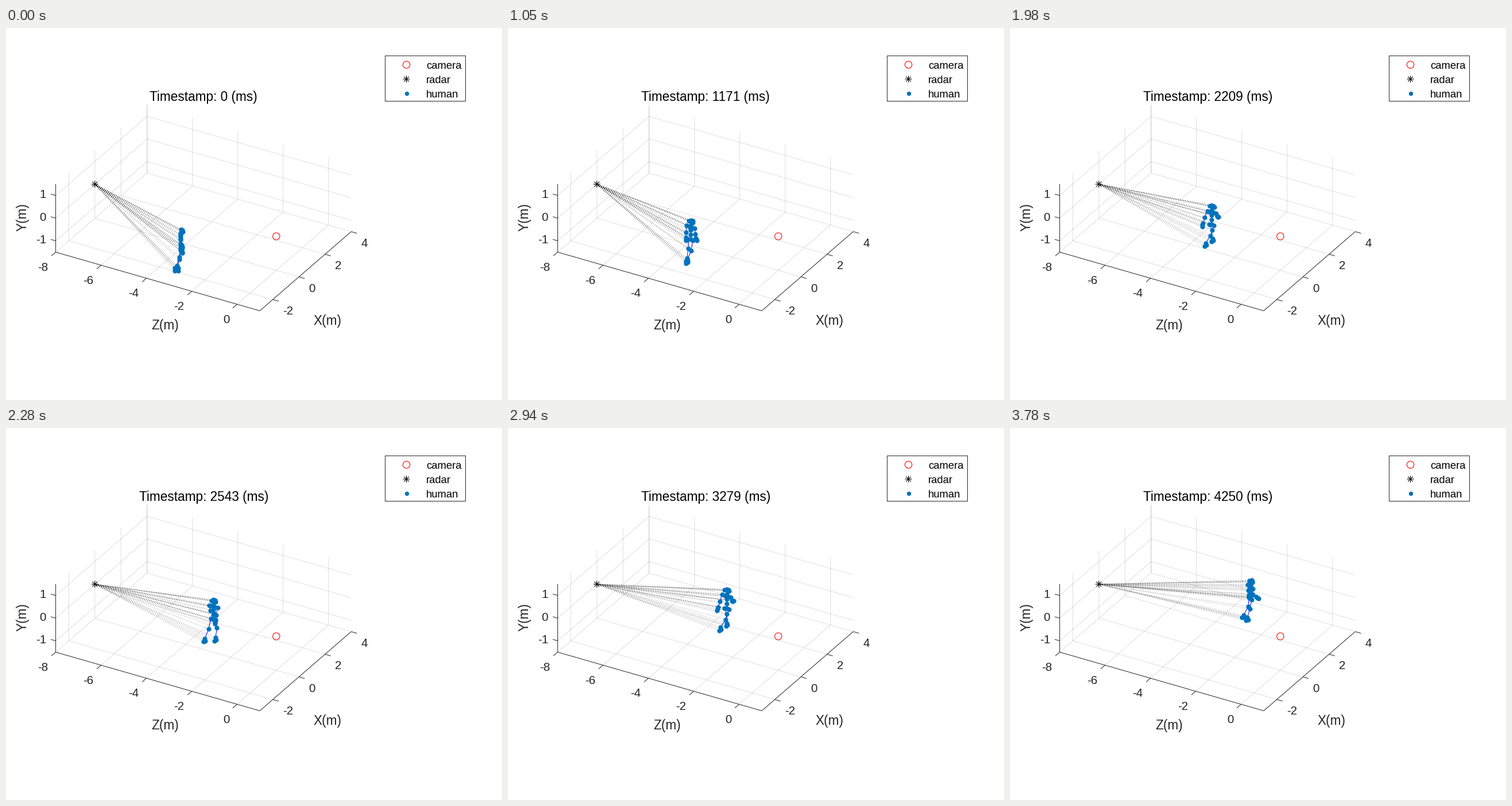
Recreate the animation shown at these times as a matplotlib script. Size 864 by 648 pixels, loop 3810 ms.

```python
import numpy as np
import matplotlib.pyplot as plt
from matplotlib.animation import FuncAnimation
from matplotlib.collections import LineCollection

W, H, DPI = 864, 648, 100
FRAMES, INTERVAL = 127, 30
DARK = (0.15, 0.15, 0.15)
GRID = (0.15, 0.15, 0.15, 0.15)
BLUE = (0, 114 / 255, 189 / 255)
PX = 72 / DPI  # points per pixel
plt.rcParams["font.family"] = "Liberation Sans"
plt.rcParams["path.snap"] = False

fig = plt.figure(figsize=(W / DPI, H / DPI), dpi=DPI, facecolor="white")
ax = fig.add_axes([0, 0, 1, 1])
ax.set_xlim(-0.5, W - 0.5)
ax.set_ylim(H - 0.5, -0.5)
ax.axis("off")

# Orthographic view: pixel step of one metre along X, Y and Z
ORIGIN = np.array([470.3, 362.4])
STEP = np.array([[22.75, -19.7], [0, -39.5], [39.5, 11.35]])


def project(p):
    return ORIGIN + np.asarray(p, float) @ STEP


def segments(pairs, color, width=1.0, z=1, **kw):
    lines = LineCollection(pairs, colors=[color], linewidths=width * PX,
                           zorder=z, **kw)
    ax.add_collection(lines)
    return lines


def label(x, y, text, size, ha="center", **kw):
    return ax.text(x, y, text, fontsize=size * PX, ha=ha, va="baseline", **kw)


def disc(x, y, size, z, **kw):
    return ax.scatter(x, y, s=(size * PX) ** 2, zorder=z, **kw)


def draw_axes():
    x0, x1, y0, y1, z0, z1 = -3, 4, -1.5, 1.5, -8, 1
    xs, ys, zs = (-2, 0, 2, 4), (-1, 0, 1), (-8, -6, -4, -2, 0)
    grid = []
    for x in xs:
        grid += [((x, y0, z0), (x, y0, z1)), ((x, y0, z0), (x, y1, z0))]
    for z in zs:
        grid += [((x0, y0, z), (x1, y0, z)), ((x1, y0, z), (x1, y1, z))]
    for y in ys:
        grid += [((x0, y, z0), (x1, y, z0)), ((x1, y, z0), (x1, y, z1))]
    segments([project(g) for g in grid], GRID)

    front = [((x0, y0, z0), (x0, y1, z0)), ((x0, y0, z0), (x0, y0, z1)),
             ((x0, y0, z1), (x1, y0, z1))]
    segments([project(f) for f in front], DARK, z=2)

    ticks = []
    for x in xs:
        p = project((x, y0, z1))
        ticks.append((p, p + (10, 2.9)))
        label(p[0] + (26 if x < 0 else 23), p[1] + 26, str(x), 20.6, color=DARK)
    for y in ys:
        p = project((x0, y, z0))
        ticks.append((p, p - (8.5, 2.4)))
        label(69.5, p[1] + 4.5, str(y), 20.6, "right", color=DARK)
    for z in zs:
        p = project((x0, y0, z))
        ticks.append((p, p + (-7.5, 6.5)))
        label(p[0] - (22 if z < 0 else 18.5), p[1] + 32.5, str(z), 20.6, color=DARK)
    segments(ticks, DARK, z=2)

    label(277, 525, "Z(m)", 22.6, color=DARK)
    label(559, 517, "X(m)", 22.6, color=DARK)
    ax.text(39.5, 329.5, "Y(m)", fontsize=22.6 * PX, rotation=90, color=DARK,
            ha="right", va="center")


def camera_mark(x, y):
    disc(x, y, 12.3, 4, facecolors="none", edgecolors="red", linewidths=1.1 * PX)


def radar_mark(x, y):
    d = 4.3
    arms = [((x - a, y - b), (x + a, y + b))
            for a, b in ((6, 0), (0, 6), (d, d), (d, -d))]
    segments(arms, "black", 1.1, 4)


def draw_legend():
    ax.add_patch(plt.Rectangle((660, 48), 140, 79, fc="white", ec=DARK,
                               lw=PX, zorder=3))
    camera_mark(697, 63.5)
    radar_mark(697, 88.5)
    disc(697, 113, 7.4, 4, color=BLUE, linewidths=0)
    for i, name in enumerate(("camera", "radar", "human")):
        label(731.5, 70.5 + 25 * i, name, 18.5, "left", zorder=4)


def ramp(t, a, b):
    return float(np.clip((t - a) / (b - a), 0, 1))


def smooth_track(times, values):
    t = np.arange(-3, FRAMES + 4)
    return np.convolve(np.interp(t, times, values), np.ones(5) / 5, "same")[3:]


WALK_X = smooth_track([8, 14, 20, 26, 35, 50, 66, 85, 98, 127, 131],
                      [0, .04, .17, .387, .765, 1.41, 2.12, 3.016, 3.516, 4.6, 4.75])
WALK_Z = smooth_track([8, 35, 50, 66, 85, 98, 112, 127, 131],
                      [0, -.08, -.02, -.02, -.06, -.08, .01, .26, .34])
HEADING = smooth_track([0, 12, 30, 40, 60, 98, 127], [1.05, .95, .2, .05, 0, 0, .5])
# Half strides: even values put the +Z leg in front
STRIDE = ([11, 27, 46, 65, 81, 100, 118, 127], [-2, -1, 0, 1, 2, 3, 4, 4.5])


def limb(start, angle, length):
    """Swing a bone forward by angle from hanging straight down."""
    return start + length * np.array([np.sin(angle), 0, -np.cos(angle)])


def body(t):
    """Chains of joints as (forward, sideways, up) from the pelvis."""
    phase = np.pi * np.interp(t, *STRIDE)
    amp = ramp(t, 10, 36)
    lean = 0.1 + 0.1 * amp
    late = ramp(t, 105, 127)
    neck, chest = np.array([.01, 0, .6]), np.array([0, 0, .4])
    chains = [[np.zeros(3), (0, 0, .2), chest, neck, (.05, 0, .76), (.09, 0, .74)]]
    for side in (1, -1):
        swing = side * amp * np.cos(phase)
        lift = max(0, -side * amp * np.sin(phase))
        ahead, behind = max(0, swing), max(0, -swing)

        hip = np.array([0, .1 * side, -.02])
        thigh = 0.7 * ahead - 0.5 * behind - lean + 0.1 * lift
        shank = thigh - 0.12 - 0.25 * ahead - 0.35 * behind - 0.35 * lift
        knee = limb(hip, thigh, .41)
        ankle = limb(knee, shank, .4)
        chains.append([np.zeros(3), hip, knee, ankle, ankle + (-.08, 0, -.1)])
        chains.append([ankle, ankle + (.04, 0, -.11)])

        # Each arm swings against the leg on its side
        shoulder = np.array([0, .19 * side, .54])
        upper = 0.05 + 0.5 * behind - 0.8 * ahead
        fore = upper + 0.12 + 0.4 * behind + 0.6 * late * (side > 0)
        elbow = limb(shoulder, upper, .28)
        wrist = limb(elbow, fore, .23) - (0, .15 * side * behind, 0)
        hand = limb(wrist, fore, .07)
        chains.append([chest, shoulder * (1, .35, 1), shoulder, elbow, wrist,
                       hand, limb(hand, fore, .06)])

        chains.append([(.05, 0, .76), (.08, .04 * side, .79), (.02, .1 * side, .77)])
    return chains


def pose(t):
    c, s = np.cos(HEADING[t]), np.sin(HEADING[t])
    turn = np.array([[c, 0, s], [-s, 0, c], [0, 1, 0]])
    size = 1 - 0.06 * ramp(t, 105, 127)
    root = np.array([-2.485 + WALK_X[t], -.1, -2.80 + WALK_Z[t]])
    return [project(root + size * np.array(chain) @ turn) for chain in body(t)]


draw_axes()
draw_legend()
camera_mark(*project((0, 0, 0)))
RADAR = project((0, 0, -8))
radar_mark(*RADAR)

title = label(343.7, 126.2, "", 22.6, color="black")
rays = segments([], (0, 0, 0, 0.4), 1.0, 3, linestyles=[(0, (1, 2))])
bones = segments([], (0, 0, 1), 1.0, 4.5)
dots = disc([], [], 8.2, 5, color=BLUE, linewidths=0)


def update(frame):
    tick = frame + (frame >= 112)  # one sample is skipped near the end
    title.set_text(f"Timestamp: {round(tick * 33.463)} (ms)")
    chains = pose(tick)
    joints = np.unique(np.vstack(chains).round(2), axis=0)
    rays.set_segments([(RADAR, j) for j in joints])
    dots.set_offsets(joints)
    bones.set_segments(chains)
    return title, rays, dots, bones


anim = FuncAnimation(fig, update, frames=FRAMES, interval=INTERVAL,
                     repeat=True, repeat_delay=0, blit=False)
plt.show()
```
